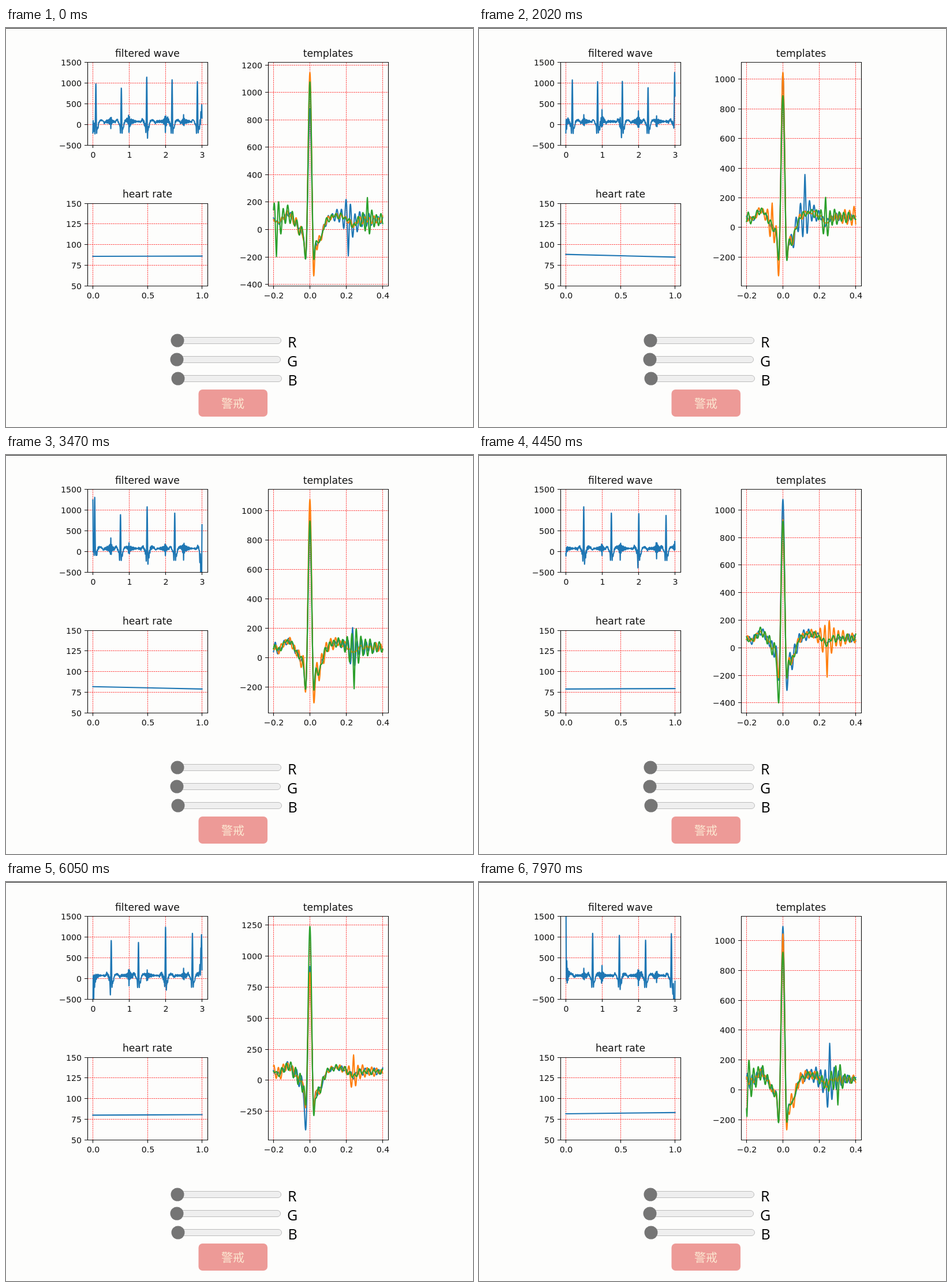
An HTML page for the animation above (8 s loop, 809 px wide and 692 px high).

```html
<!DOCTYPE html>
<html lang="ja">
<head>
<meta charset="utf-8">
<title>Pulse monitor</title>
<style>
html, body { margin: 0; width: 100%; height: 100%; overflow: hidden; background: #fdfdfc; }
svg { display: block; width: 809px; height: 692px; }
.tick, .title { font-family: "DejaVu Sans", sans-serif; fill: #111; }
.tick { font-size: 14.2px; }
.title { font-size: 17.2px; text-anchor: middle; }
.mid { text-anchor: middle; }
.end { text-anchor: end; }
.grid { stroke: #f22; stroke-width: .8; stroke-dasharray: 2.6 1.1; fill: none; }
.axis { stroke: #111; stroke-width: 1.15; fill: none; }
.line { stroke-width: 2.15; fill: none; stroke-linejoin: round; stroke-linecap: square; }
.name { font: 25px "Open Sans", "Noto Sans", sans-serif; fill: #000; }
.alert { font: 20px "Noto Sans CJK JP", "Noto Sans CJK SC", "Noto Sans CJK", sans-serif; fill: #fbe8d2; text-anchor: middle; }
</style>
</head>
<body>
<svg viewBox="0 0 809 692">
  <defs><clipPath id="clip"><rect x="141" y="59.5" width="208" height="143.5"/></clipPath></defs>
  <rect width="809" height="692" fill="#fdfdfc"/>
  <rect width="809" height="1" fill="#222"/>
  <g id="plots"></g>
  <g id="controls"></g>
</svg>
<script>
const LOOP = 8000, UPDATE = 504, LEAD = 206;
const COLORS = ['#1f77b4', '#ff7f0e', '#2ca02c', '#d62728'];
const PEAKS = [990, 880, 1146, 1077, 1040, 1047, 890, 1077, 930, 920, 870, 1240, 1096, 1046, 923, 1080];
const GAP_KEYS = [[1, .7], [4, .695], [5, .68], [8, .759], [13, .734], [15, .708]];

const cosine = (hz, t) => Math.cos(2 * Math.PI * hz * t);
const bump = (x, at, w) => Math.exp(-(((x - at) / w) ** 2));
const range = (from, to, count, fn) => Array.from({ length: count + 1 }, (_, i) => {
  const x = from + (to - from) * i / count;
  return [x, fn(x)];
});

function gap(k) {
  const i = GAP_KEYS.findIndex(([at]) => at >= k) || 1;
  const [[k0, g0], [k1, g1]] = GAP_KEYS.slice(i - 1, i + 1);
  return g0 + (g1 - g0) * (k - k0) / (k1 - k0);
}

// a join of two half-second blocks close to a beat deepens one of its dips
let time = .083;
const BEATS = PEAKS.map((peak, k) => {
  if (k) time += gap(k);
  const join = Math.round(time * 2), d = join / 2 - time, after = d > 0;
  const extra = (join % 2 ? 210 : 100) * bump(d, 0, after ? .03 : .06);
  return { time, peak, q: 255 + (after ? 0 : extra), s: 240 + (after ? extra : 0) };
});

const pulse = (u, { peak, q, s }) => 70
  + 45 * bump(u, -.122, .028) - 18 * bump(u, -.17, .02)
  - 85 * bump(u, -.045, .03) - q * bump(u, -.023, .009)
  + (peak - 43) * bump(u, 0, .012)
  - s * bump(u, .02, .008) - 170 * bump(u, .045, .03)
  + 32 * bump(u, .15, .05) - 40 * bump(u, .237, .022);

// ringing at the joins, flipping its sign every five joins
function ringing(t) {
  const k = Math.round(t * 2), d = t - k / 2 + .006, a = Math.abs(d);
  const height = (k % 10 < 5 ? -1 : 1) * (k % 2 ? 170 : 255);
  return height * cosine(40, d) * (.35 * Math.exp(-a / .1) + .65 * Math.exp(-a / .012));
}

function signal(t) {
  const beat = BEATS.findLast(b => b.time - .2 <= t) || BEATS[0];
  const u = t - beat.time;
  const noise = ringing(t) + 11 * cosine(37, t) + 8 * cosine(23.3, t + .01);
  return pulse(u, beat) + noise * (1 - Math.exp(-((u / .032) ** 4)));
}

// slow baseline drift makes the filter overshoot at both window borders
function sample(n, x) {
  const drift = -Math.cos(2 * Math.PI * (n - 2) / 9.2), e = 3 - x;
  const head = .5 * (1 + cosine(40, x)) * Math.exp(-x / .035);
  const tail = bump(e, .015, .01) + .5 * bump(e, .033, .008) + .2 * bump(e, .06, .01);
  return signal(n / 2 + x) + 1300 * drift * (head - tail);
}

const snap = v => Math.floor(v) + .5;
const label = (v, dec) => v.toFixed(dec).replace('-', '\u2212');
const steps = (from, to, step) => {
  const out = [];
  for (let v = Math.ceil(from / step) * step; v <= to + 1e-9; v += step) out.push(v);
  return out;
};

function chart(o) {
  const { left, top, w, h, xr, yr } = o;
  const px = v => left + w / 22 + (v - xr[0]) / (xr[1] - xr[0]) * w / 1.1;
  const py = v => top + h - (v - yr[0]) / (yr[1] - yr[0]) * h;
  const bottom = top + h;
  let grid = '', ticks = '', text = '';
  for (const v of o.xt) {
    const x = snap(px(v));
    grid += `M${x} ${bottom}V${top}`;
    ticks += `M${x} ${bottom}v5`;
    text += `<text class="tick mid" x="${x + .5}" y="${bottom + 21.5}">${label(v, o.dec)}</text>`;
  }
  for (const v of o.yt) {
    const y = snap(py(v));
    grid += `M${left} ${y}H${left + w}`;
    ticks += `M${left} ${y}h-5`;
    text += `<text class="tick end" x="${left - 10}" y="${y + 5}">${label(v, 0)}</text>`;
  }
  const lines = o.lines.map((pts, i) => {
    const d = pts.map(([x, y]) => px(x).toFixed(2) + ' ' + py(y).toFixed(2)).join('L');
    return `<path class="line" stroke="${COLORS[i]}" d="M${d}"/>`;
  }).join('');
  return `<path class="grid" d="${grid}"/><g ${o.clip ? 'clip-path="url(#clip)"' : ''}>${lines}</g>
    <path class="axis" d="${ticks}M${snap(left)} ${snap(top)}H${snap(left + w)}V${snap(bottom)}H${snap(left)}Z"/>${text}
    <text class="title" x="${left + w / 2}" y="${top - 10}">${o.title}</text>`;
}

function draw(n) {
  const start = n / 2;
  const inside = BEATS.map(b => b.time).filter(t => t > start + .2 && t < start + 2.6);
  const rates = inside.slice(1).map((t, i) => [i, 60 / (t - inside[i])]);
  const shapes = inside.map(t => range(-.2, .4, 600, u => sample(n, t - start + u)));
  const ys = shapes.flat().map(p => p[1]);
  const lo = Math.min(...ys), hi = Math.max(...ys), pad = (hi - lo) * .05;
  const yr = [lo - pad, hi + pad];
  const step = [100, 200, 250, 500].find(s => s >= (yr[1] - yr[0]) / 9);
  const last = rates.length - 1;

  document.getElementById('plots').innerHTML =
    chart({ title: 'filtered wave', left: 141, top: 59.5, w: 208, h: 143.5, xr: [0, 3], yr: [-500, 1500],
      xt: steps(0, 3, 1), yt: steps(-500, 1500, 500), dec: 0, clip: true,
      lines: [range(0, 3, 1500, x => sample(n, x))] }) +
    chart({ title: 'heart rate', left: 141, top: 304, w: 208, h: 143.5, xr: [0, last], yr: [50, 150],
      xt: steps(0, last, last / 2), yt: steps(50, 150, 25), dec: last > 1 ? 0 : 1, lines: [rates] }) +
    chart({ title: 'templates', left: 454, top: 59.5, w: 208, h: 388, xr: [-.2, .4], yr,
      xt: [-.2, 0, .2, .4], yt: steps(...yr, step), dec: 1, lines: shapes });
}

document.getElementById('controls').innerHTML =
  [['R', 297, 488], ['G', 296, 487], ['B', 298, 488.5]].map(([name, x, at], i) => {
    const y = 542 + 33 * i;
    return `<rect x="${x - 10.5}" y="${y - 5.5}" width="190" height="11" rx="5.5" fill="#efefef" stroke="#bdbdbd"/>
      <circle cx="${x}" cy="${y}" r="11.5" fill="#757575"/>
      <text class="name" x="${at}" y="${y + 12}">${name}</text>`;
  }).join('') +
  `<rect x="333.5" y="627" width="119.5" height="47" rx="7" fill="#ed9a97"/>
   <text class="alert" x="393" y="659">警戒</text>`;

let shown = -1;
const begin = performance.now();
function tick() {
  const t = (performance.now() - begin) % LOOP;
  const n = Math.floor((t + LEAD) / UPDATE);
  if (n !== shown) draw(shown = n);
  requestAnimationFrame(tick);
}
tick();
</script>
</body>
</html>
```
